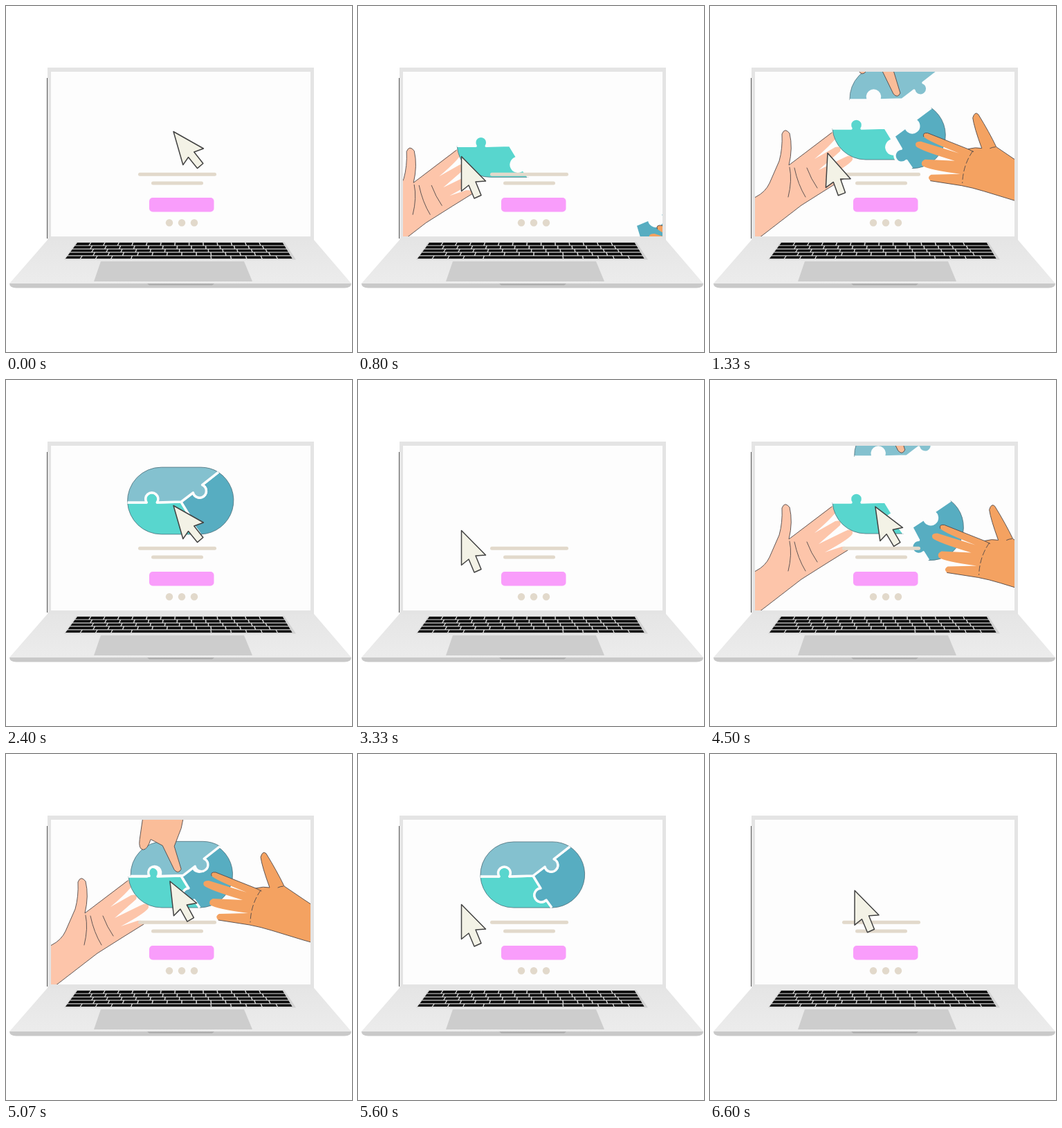
Write an HTML page that moves like this. It is 500 px wide and 500 px high and loops after 6.63 s.

```html
<!DOCTYPE html>
<html lang="en">
<head>
<meta charset="utf-8">
<title>Laptop puzzle</title>
<style>
  html, body { margin: 0; width: 100%; height: 100%; overflow: hidden; background: #fff; }
  svg { display: block; width: 100vw; height: 100vh; }
  .ink { fill: none; stroke: #50494a; stroke-width: .9; stroke-linecap: round; stroke-linejoin: round; }
  .seam { fill: none; stroke: #fdfdfd; stroke-width: 3.4; stroke-linejoin: round; }
  .rim { fill: none; stroke: #4d6f7a; stroke-width: .8; }
</style>
</head>
<body>
<svg viewBox="0 0 500 500">
  <defs>
    <linearGradient id="deck" x1="0" y1="0" x2="0" y2="1">
      <stop offset="0" stop-color="#e5e5e5"/><stop offset="1" stop-color="#ececec"/>
    </linearGradient>
    <clipPath id="view"><rect x="65" y="95" width="375" height="238"/></clipPath>
  </defs>

  <path d="M59.7 104V336" stroke="#555" stroke-width="1.4"/>
  <rect x="60" y="89" width="385" height="250" fill="#e4e4e4"/>
  <rect x="65" y="95" width="375" height="238" fill="#fdfdfd"/>
  <path d="M60 338H445L499 401H5Z" fill="url(#deck)"/>
  <path d="M5 401H499Q499 407 489 407.500H15Q5 407 5 401Z" fill="#c9c9c9"/>
  <path d="M204 401H301L298 403.500H207Z" fill="#aeaeae"/>
  <path d="M102 341H402L419 366.500H84Z" fill="#d2d2d2"/>
  <path id="keys" fill="#0b0b0b"/>
  <path d="M137 369H344L356 398H127Z" fill="#cdcdcd"/>

  <g clip-path="url(#view)">
    <g id="leftHand">
      <path fill="#fdc5aa" d="M50 285L66 276Q80 269 86 256L100 224Q105 206 104 185Q108 175 115 184Q120 205 114 230L170 187Q180 178 184 185Q185 192 151 221L181 204Q191 202 188 210L157 237L194 219Q207 213 206 222Q203 229 166 249L190 241Q202 240 199 246L170 264L132 288L75 332L50 350Z"/>
      <path class="ink" d="M50 285L66 276Q80 269 86 256L100 224Q105 206 104 185Q108 175 115 184Q120 205 114 230L176 183M199 246L170 264L132 288L75 332L50 350"/>
      <path class="ink" d="M115 233Q119 252 113 276M122 234Q127 258 138 276M140 234Q146 250 155 263"/>
    </g>
    <g id="puzzle">
      <g id="leftPiece"></g>
      <g id="rightPiece"></g>
      <g id="topPiece"></g>
    </g>
    <g id="rightHand">
      <g transform="translate(-10 -13)">
        <path fill="#f4a261" d="M490 256L440 223L412 204Q402 183 386 157Q381 152 378 162Q380 176 391 206Q382 204 371 207L313 184Q305 183 307 189Q312 195 358 213L303 196Q293 196 296 203Q302 209 352 224L309 222Q302 225 305 231Q314 237 360 243L318 244Q311 248 317 253L362 260Q378 263 394 268L440 282L490 296Z"/>
        <path class="ink" d="M490 256L440 223L412 204Q402 183 386 157Q381 152 378 162Q380 176 391 206Q382 204 371 207L313 184Q305 183 307 189M317 253L362 260Q378 263 394 268L440 282L490 296M371 207L379 211"/>
        <path class="ink" stroke-dasharray="8 4" d="M378 210Q364 230 363 256M403 206Q407 204 412 204"/>
      </g>
    </g>
    <g id="topHand">
      <path class="ink" style="fill:#fabd99" d="M205 20L190 124Q188 138 195 139Q201 139 206 124L223 133L240 168Q246 175 250 167L240 134L250 108L268 20Z"/>
    </g>
  </g>

  <g fill="#e2d9cb">
    <rect x="191" y="240.700" width="113" height="5" rx="2.500"/>
    <rect x="210" y="253.500" width="75" height="5" rx="2.500"/>
    <circle cx="236" cy="313.300" r="5.200"/>
    <circle cx="254" cy="313.300" r="5.200"/>
    <circle cx="272" cy="313.300" r="5.200"/>
  </g>
  <rect x="207" y="277" width="93.500" height="20.500" rx="5" fill="#f99dfb"/>
  <path id="cursor" d="M0 0L35 35.500L20.500 36.500L28.500 56L18.500 60.500L10.500 41.500L0 50Z" fill="#f3f2e6" stroke="#424242" stroke-width="1.500" stroke-linejoin="round"/>
</svg>
<script>
const LOOP = 6630, PUZZLE = LOOP / 2, SWING = 2460;
const $ = id => document.getElementById(id);
const clamp = x => Math.max(0, Math.min(1, x));
const span = (t, from, to) => clamp((t - from) / (to - from));
const inOut = u => u < .5 ? 2 * u * u : 1 - 2 * (1 - u) ** 2;
const sine = u => (1 - Math.cos(Math.PI * u)) / 2;
const smooth = u => u * u * (3 - 2 * u);

// Shared seams: left edge to centre, centre to upper right, centre to bottom.
const toCentre = 'L204 177A9 9 0 1 1 219 177L253 176';
const toCorner = 'L270 163A9.5 9.5 0 1 0 283 152L306 134';
const toBottom = 'L264 194A10 10 0 1 0 272 211L280 222';
const bottomToCentre = 'L272 211A10 10 0 1 1 264 194L253 176';

function buildPiece(id, fill, start, seam, seamEnd, rim) {
  $(id).innerHTML =
    `<path d="M${start}${seam}${rim}Z" fill="${fill}"/>` +
    `<path class="rim" d="M${seamEnd}${rim}"/>` +
    `<path class="seam" d="M${start}${seam}"/>`;
}
buildPiece('topPiece', '#84c1cf', '177 177', toCentre + toCorner, '306 134',
  'A48 48 0 0 0 281 127H225A48 48 0 0 0 177 177');
buildPiece('leftPiece', '#58d6ce', '177 177', toCentre + toBottom, '280 222',
  'H225A48 48 0 0 1 177 177');
buildPiece('rightPiece', '#57adc1', '280 222', bottomToCentre + toCorner, '306 134',
  'A48 48 0 0 1 281 222L280 222');

function buildKeys() {
  const edge = y => [103 - (y - 341) * .74, 400 + (y - 341) * .6];
  const rows = 5, pitch = 4.85, gap = .8;
  let d = '';
  for (let row = 0; row < rows; row++) {
    const top = 342 + row * pitch, bottom = top + pitch - 1.2;
    const widths = row === rows - 1
      ? [1, 1, 1, 1.3, 5.2, 1.3, 1, 1, 1, 1]
      : Array.from({ length: 14 }, (_, i) => i === 0 ? 1 + row * .25 : i === 13 ? 1.7 - row * .1 : 1);
    const total = widths.reduce((a, b) => a + b);
    const x = (y, u) => edge(y)[0] + (edge(y)[1] - edge(y)[0]) * u;
    let sum = 0;
    for (const w of widths) {
      const a = sum / total, b = (sum += w) / total;
      d += `M${x(top, a) + gap} ${top}L${x(top, b) - gap} ${top}` +
           `L${x(bottom, b) - gap} ${bottom}L${x(bottom, a) + gap} ${bottom}Z`;
    }
  }
  $('keys').setAttribute('d', d);
}
buildKeys();

const place = (id, x, y, extra = '') =>
  $(id).setAttribute('transform', `translate(${x.toFixed(2)} ${y.toFixed(2)})${extra}`);

// bend below 1 curves the way in; tilt turns the piece while it is away.
const actors = [
  { side: 'left', from: 80, to: 1095, dx: -200, dy: 150, bend: 1, tilt: 0 },
  { side: 'right', from: 490, to: 1525, dx: 165, dy: 178, bend: 1, tilt: 18 },
  { side: 'top', from: 742, to: 1817, dx: 39, dy: -100, bend: .5, tilt: 0 }
];

function drawPuzzle(t) {
  const leave = span(t, 1800, 2275) ** 2;
  for (const { side, from, to, dx, dy, bend, tilt } of actors) {
    const away = 1 - inOut(span(t, from, to));
    const x = dx * away ** bend, y = dy * away;
    place(side + 'Piece', x, y, ` rotate(${(tilt * away).toFixed(2)} 280 222)`);
    place(side + 'Hand', x + dx * leave, y + dy * leave);
  }
  const swell = 1 + .026 * smooth(span(t, 2250, 2480));
  const scale = swell * (1 - span(t, 2480, 3270) ** 2);
  place('puzzle', 253, 174.5, ` scale(${scale.toFixed(4)}) translate(-253 -174.5)`);
  $('puzzle').style.display = scale > .001 ? '' : 'none';
}

function drawCursor(t) {
  const u = t < 800 ? 1 - span(t, 60, 660) : span(t, 942, 2186);
  const k = sine(u);
  const lift = u < .6 ? 3 * Math.sin(Math.PI * u / .6) : 0;
  const angle = lift - 16 * span(u, .6, 1) ** 2;
  place('cursor', 149.5 + 92.5 * k, 217.5 - 36 * k ** 1.3, ` rotate(${angle.toFixed(2)})`);
}

function draw(now) {
  const t = now % LOOP;
  drawPuzzle(t % PUZZLE);
  drawCursor(t % SWING);
}

let start;
function tick(now) {
  start ??= now;
  draw(now - start);
  requestAnimationFrame(tick);
}
draw(0);
requestAnimationFrame(tick);
</script>
</body>
</html>
```
